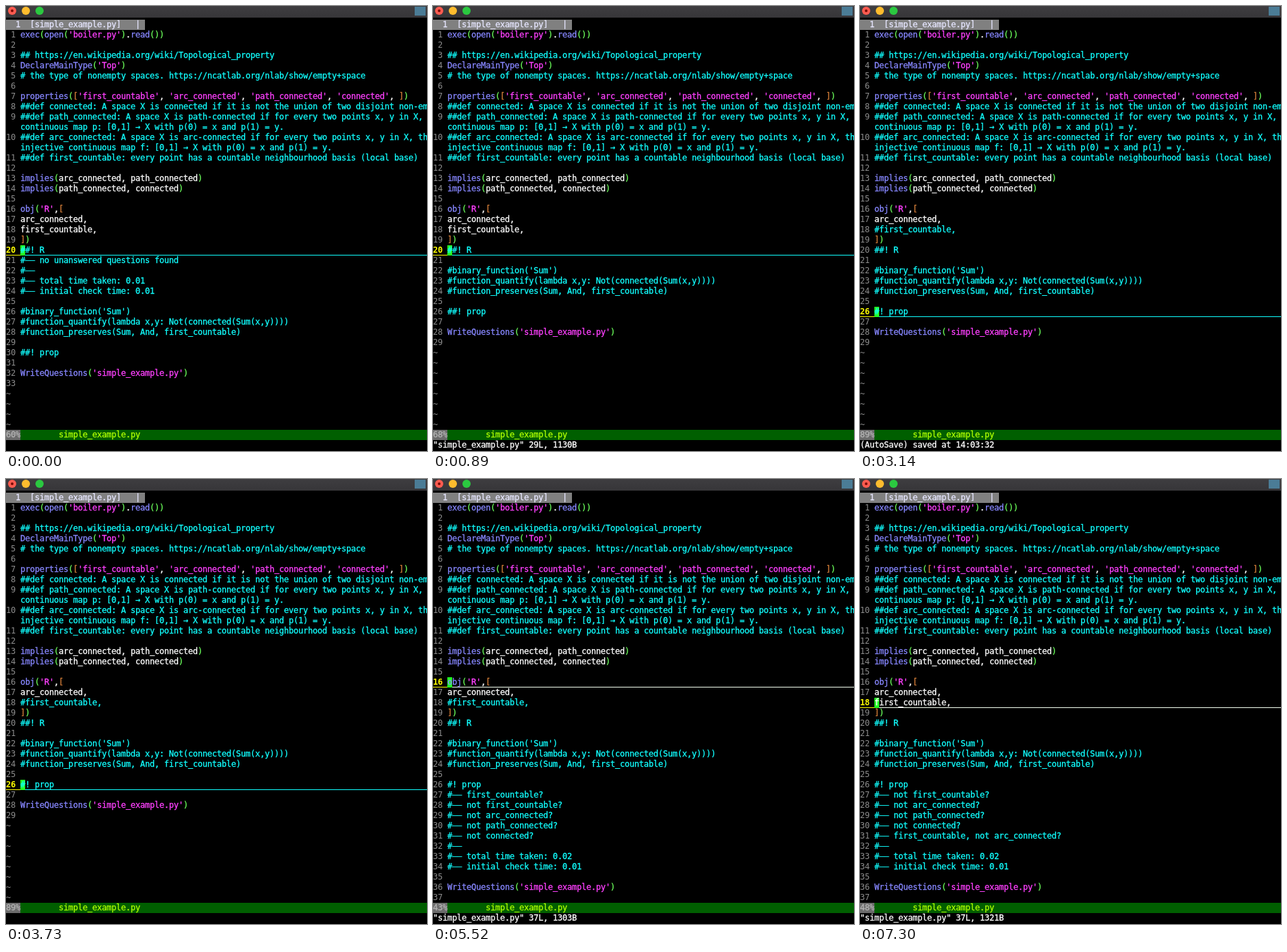
Recreate the animation shown at these times as an HTML page. Size 615x651 px, loop 8000 ms.

```html
<!DOCTYPE html>
<html lang="en">
<head>
<meta charset="utf-8">
<title>Editor session</title>
<style>
html, body { margin: 0; width: 100%; height: 100%; overflow: hidden; background: #000; }
#stage {
  position: relative; width: 615px; height: 651px; overflow: hidden; background: #000;
  font: 12px/15px "DejaVu Sans Mono", "Liberation Mono", monospace;
  letter-spacing: calc(7px - 1ch); color: #fff;
}
#stage div { position: absolute; }
#screen { left: 0; top: 0; width: 615px; height: 651px; }
.bar { left: 0; top: 0; width: 615px; height: 17px; background: linear-gradient(#3e3d40, #373639); }
.light { top: 1px; width: 12px; height: 12px; border-radius: 50%; }
.dot { left: 4px; top: 4px; width: 4px; height: 4px; border-radius: 50%; background: #7a0c08; }
.icon { left: 597px; top: 1px; width: 16px; height: 13px; background: #4b7c96; }
.row { left: 0; width: 615px; height: 15px; white-space: pre; -webkit-text-stroke: .3px; }
.tab { width: 203px; background: #808080; color: #e6e6ff; }
.current { background: linear-gradient(90deg, #ff0 21px, var(--line) 21px) 0 14px / 100% 1px no-repeat; }
.num { color: #8c8c8c; -webkit-text-stroke: 0; }
.current .num { color: #ff0; font-weight: bold; }
.comment { color: #1ff; }
.call { color: #8787ff; }
.string { color: #ff40ff; }
.paren { color: #6bff5b; }
.bracket { color: #d9803a; }
.plain { color: #fff; }
.cursor { display: inline-block; width: 7px; height: 15px; vertical-align: top; background: #2f2; }
.status { background: #005f00; color: #afff00; }
.percent { display: inline-block; width: 21px; height: 15px; vertical-align: top; background: #6c6c6c; color: #b4b4b4; }
</style>
</head>
<body>
<div id="stage">
<div class="bar"></div>
<div class="light" style="left:3px;background:#ff5b50"><div class="dot"></div></div>
<div class="light" style="left:23px;background:#fdbc2e"></div>
<div class="light" style="left:43px;background:#2bc840"></div>
<div class="icon"></div>
<div id="screen"></div>
</div>
<script>
const LOOP = 8000, LAST_ROW = 39;
const screenBox = document.getElementById("screen");

// Lines starting with ">" continue the line above.
const head = `exec(open('boiler.py').read())

## https://en.wikipedia.org/wiki/Topological_property
DeclareMainType('Top')
# the type of nonempty spaces. https://ncatlab.org/nlab/show/empty+space

properties(['first_countable', 'arc_connected', 'path_connected', 'connected', ])
##def connected: A space X is connected if it is not the union of two disjoint non-empty
##def path_connected: A space X is path-connected if for every two points x, y in X,
>continuous map p: [0,1] → X with p(0) = x and p(1) = y.
##def arc_connected: A space X is arc-connected if for every two points x, y in X, there
>injective continuous map f: [0,1] → X with p(0) = x and p(1) = y.
##def first_countable: every point has a countable neighbourhood basis (local base)

implies(arc_connected, path_connected)
implies(path_connected, connected)

obj('R',[
arc_connected,`.split("\n");

const middle = `
#binary_function('Sum')
#function_quantify(lambda x,y: Not(connected(Sum(x,y))))
#function_preserves(Sum, And, first_countable)
`.split("\n");

const tail = ["", "WriteQuestions('simple_example.py')", ""];

// Dashes in answers join into one stroke.
const answers = (list, total) =>
  [...list, "", "total time taken: " + total, "initial check time: 0.01"].map(s => "#–– " + s);

const none = answers(["no unanswered questions found"], "0.01");
const nots = ["not first_countable?", "not arc_connected?", "not path_connected?", "not connected?"];
const before = answers(["first_countable?", ...nots], "0.02");
const after = answers([...nots, "first_countable, not arc_connected?"], "0.02");

const file = s => [...head, (s.off ? "#" : "") + "first_countable,", "])", "##! R", ...s.r,
  ...middle, s.prop + " prop", ...s.p, ...tail];

const written = size => `"simple_example.py" ${size}B`;
const saved = sec => "(AutoSave) saved at 14:03:" + sec;

// Each step changes only the listed parts of the state.
const steps = [
  [0, { at: 20, line: "#1ff", off: false, r: none, prop: "##!", p: [], msg: "" }],
  [890, { r: [], msg: written("29L, 1130") }],
  [1340, { at: 19, line: "#f4fff0" }],
  [1490, { at: 18 }],
  [1790, { off: true, msg: "" }],
  [2390, { at: 23 }],
  [2690, { at: 24, line: "#1ff" }],
  [2840, { at: 25 }],
  [2990, { at: 26 }],
  [3140, { prop: "#!", msg: saved(32) }],
  [3580, { msg: "" }],
  [4030, { p: before, msg: written("37L, 1303") }],
  [5380, { at: 21 }],
  [5520, { at: 16, line: "#f4fff0" }],
  [5820, { at: 17 }],
  [5970, { at: 18 }],
  [6410, { off: false, msg: "" }],
  [6560, { msg: saved(35) }],
  [7000, { msg: "" }],
  [7300, { p: after, msg: written("37L, 1321") }],
];

const span = (cls, text) => `<span class="${cls}">${text}</span>`;
const row = (n, html, cls = "", style = "") =>
  `<div class="row ${cls}" style="top:${20 + 15 * n}px;${style}">${html}</div>`;

const kinds = [
  ["string", /^'/], ["paren", /^[()]/], ["bracket", /^[[\]]/], ["call", /^\w+\($/], ["plain", /^/],
];

function tokens(text) {
  if (/^[#>]/.test(text)) return [["comment", text.replace(/^>/, "")]];
  const parts = text.match(/'[^']*'|[()]|[[\]]|\w+|[^'()[\]\w]+/g) || [" "];
  return parts.map((part, i) => {
    const probe = parts[i + 1] === "(" ? part + "(" : part;
    return [kinds.find(([, test]) => test.test(probe))[0], part];
  });
}

const codeHtml = (text, current) => tokens(text).map(([cls, part], i) =>
  span(cls, current && i === 0 ? span("cursor", part[0]) + part.slice(1) : part)).join("");

function render(s) {
  const lines = file(s), count = lines.filter(t => t[0] !== ">").length;
  let html = row(0, "  1  [simple_example.py]   |", "tab"), num = 0;
  for (let n = 1; n <= LAST_ROW; n++) {
    const text = lines[n - 1];
    if (text === undefined) { html += row(n, span("num", "~")); continue; }
    const wrapped = text[0] === ">";
    if (!wrapped) num++;
    const current = !wrapped && num === s.at;
    const label = wrapped ? "   " : String(num).padStart(2) + " ";
    html += row(n, span("num", label) + codeHtml(text, current),
      current ? "current" : "", "--line:" + s.line);
  }
  const percent = Math.floor(100 * s.at / count) + "%";
  html += row(40, span("percent", percent) + "        simple_example.py", "status");
  html += row(41, s.msg);
  screenBox.innerHTML = html;
}

let shown = -1;
function tick() {
  const t = performance.now() % LOOP;
  const now = steps.filter(([start]) => start <= t).length;
  if (now !== shown) {
    shown = now;
    render(Object.assign({}, ...steps.slice(0, now).map(([, change]) => change)));
  }
  requestAnimationFrame(tick);
}
tick();
</script>
</body>
</html>
```
